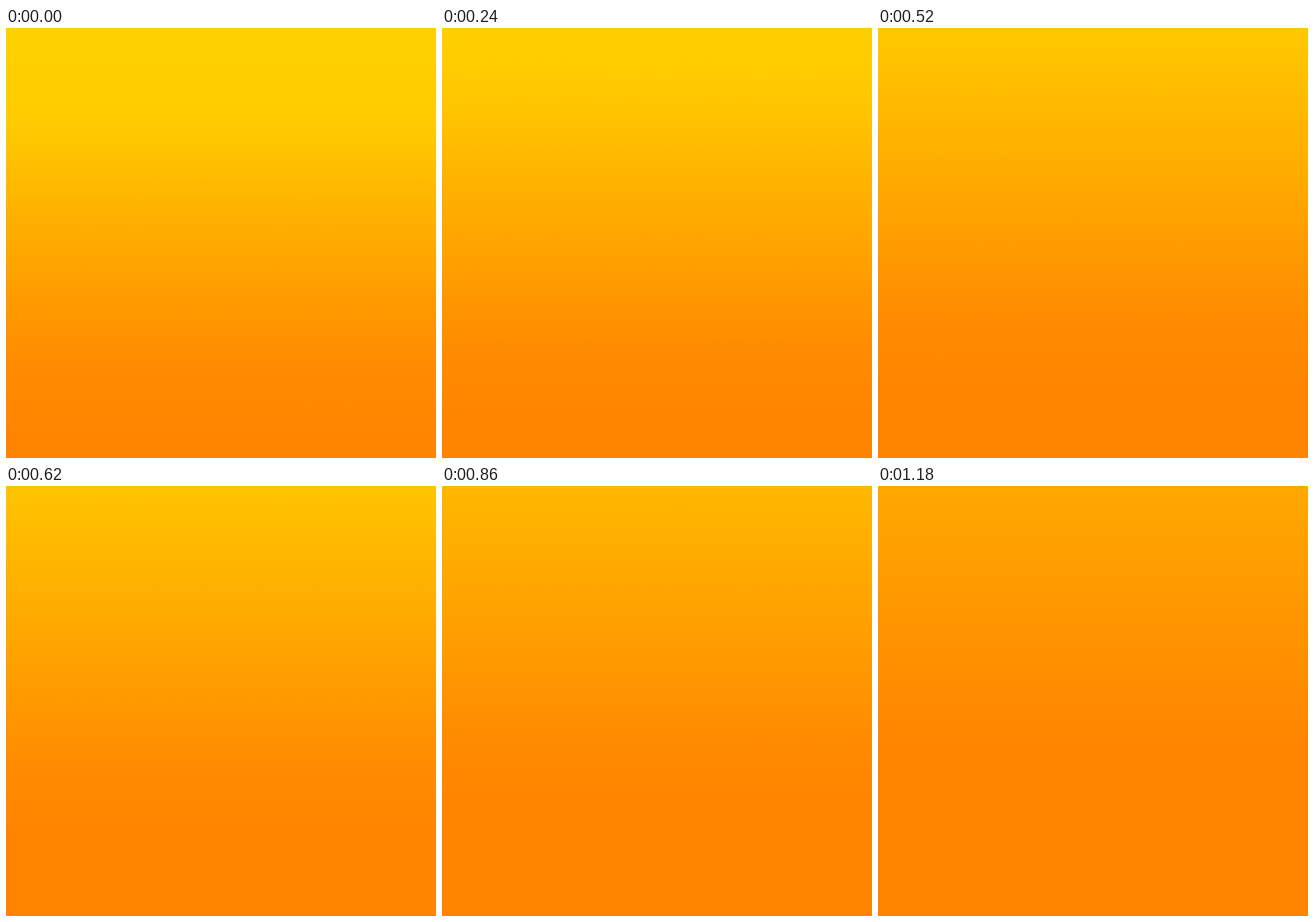
Recreate the animation shown at these times as an HTML page. Size 748 px wide and 748 px high, loop 1.2 s.

```html
<!DOCTYPE html>
<html>
<head>
<meta charset="utf-8">
<style>
html, body { margin: 0; width: 100%; height: 100%; overflow: hidden; background: #ff8400; }
#sky { width: 100%; height: 100%; }
</style>
</head>
<body>
<div id="sky"></div>
<script>
const LOOP = 1200, STEP = 20, HEIGHT = 748;
const sky = document.getElementById('sky');

// Each shade: green level, starting height, then linear and quadratic rise over the loop.
const shades = [
  [209, 0, 300, 300],
  [203, 165, 340, 200],
  [181, 300, 170, 290],
  [155, 473, 120, 200],
  [139, 590, 150, 80],
  [132, 725, 150, 120]
];

function draw(now) {
  const time = Math.floor((now % LOOP) / STEP) * STEP;
  const s = time / LOOP;
  const stops = shades.map(([green, start, rise, gain]) => {
    const y = start - rise * s - gain * s * s;
    return `rgb(255,${green},0) ${(y / HEIGHT * 100).toFixed(2)}%`;
  });
  sky.style.background = `linear-gradient(${stops.join(',')})`;
}

function tick() {
  draw(performance.now());
  requestAnimationFrame(tick);
}
tick();
</script>
</body>
</html>
```
